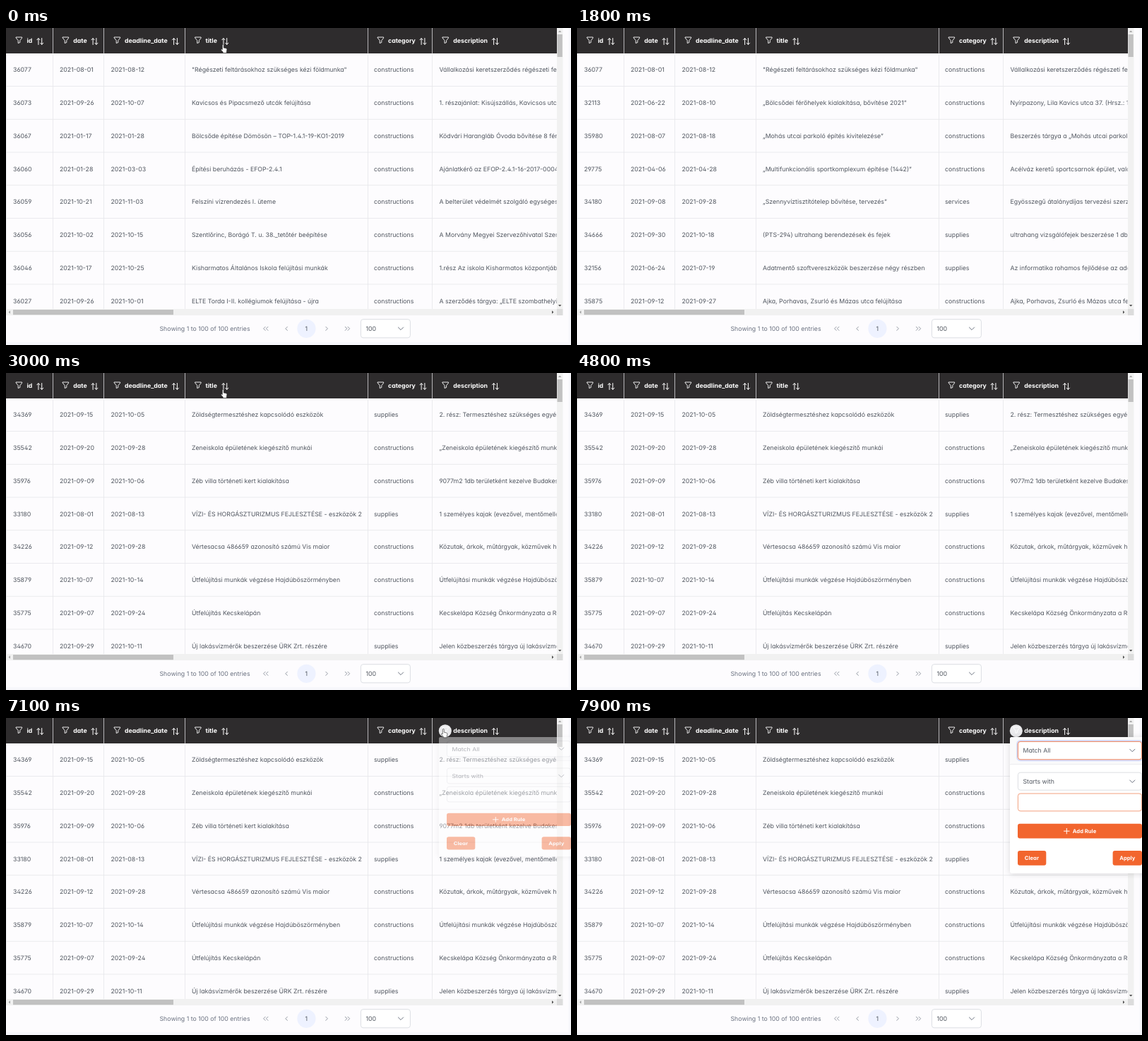
Animation of 800x449 px, one loop 8000 ms. Source, as an HTML page:

```html
<!DOCTYPE html>
<html lang="hu">
<head>
<meta charset="utf-8">
<title>Table sorting</title>
<style>
html, body { margin: 0; width: 100%; height: 100%; overflow: hidden; background: #fdfcfe; }
svg { display: block; width: 100vw; height: 100vh; }
text {
  font: 400 8.75px Inter, "Open Sans", sans-serif;
  font-feature-settings: "cv02", "cv03", "cv04", "cv11";
  text-rendering: geometricPrecision;
  fill: #50565f;
  white-space: pre;
}
.head { font-weight: 700; fill: #fff; }
.btn { font-size: 7.66px; font-weight: 700; fill: #fff; }
.muted { fill: #6b7280; }
.line { fill: none; stroke-linecap: round; stroke-linejoin: round; }
#sheet { filter: drop-shadow(0 1px 4px rgba(0, 0, 0, .14)); }
</style>
</head>
<body>
<svg id="stage" viewBox="0 0 800 449"></svg>
<script>
const COL_X = [10, 76, 148.5, 263, 521, 613.5];
const DIVIDERS = [66, 138, 253, 512, 603];
const ROW_H = 46.74, HEAD_H = 36, ORANGE = '#f2652e';

// name, filter icon x, label x, sort icon x
const HEADERS = [
  ['id', 18.5, 29.5, 48.3],
  ['date', 84.5, 95.3, 125.5],
  ['deadline_date', 157.5, 168, 240],
  ['title', 272, 282.5, 310.3],
  ['category', 530.5, 541, 590.5],
  ['description', 622.3, 633.3, 693]
];

const PAGES = [`
36077|2021-08-01|2021-08-12|"Régészeti feltárásokhoz szükséges kézi földmunka"|constructions|Vállalkozási keretszerződés régészeti feltárás
36073|2021-09-26|2021-10-07|Kavicsos és Pipacsmező utcák felújítása|constructions|1. részajánlat: Kisújszállás, Kavicsos utca
36067|2021-01-17|2021-01-28|Bölcsőde építése Dömösön – TOP-1.4.1-19-KO1-2019|constructions|Ködvári Harangláb Óvoda bővítése 8 férőhellyel
36060|2021-01-28|2021-03-03|Építési beruházás - EFOP-2.4.1|constructions|Ajánlatkérő az EFOP-2.4.1-16-2017-00045
36059|2021-10-21|2021-11-03|Felszíni vízrendezés I. üteme|constructions|A belterület védelmét szolgáló egységes vízelvezetés
36056|2021-10-02|2021-10-15|Szentlőrinc, Borágó T. u. 38._tetőtér beépítése|constructions|A Morvány Megyei Szervezőhivatal Szentlőrinc
36046|2021-10-17|2021-10-25|Kisharmatos Általános Iskola felújítási munkák|constructions|1.rész Az iskola Kisharmatos központjában
36027|2021-09-26|2021-10-01|ELTE Torda I-II. kollégiumok felújítása - újra|constructions|A szerződés tárgya: „ELTE szombathelyi`, `
36077|2021-08-01|2021-08-12|"Régészeti feltárásokhoz szükséges kézi földmunka"|constructions|Vállalkozási keretszerződés régészeti feltárás
32113|2021-06-22|2021-08-10|„Bölcsődei férőhelyek kialakítása, bővítése 2021”|constructions|Nyírpazony, Lila Kavics utca 37. (Hrsz.: 112)
35980|2021-08-07|2021-08-18|„Mohás utcai parkoló építés kivitelezése”|constructions|Beszerzés tárgya a „Mohás utcai parkoló építés
29775|2021-04-06|2021-04-28|„Multifunkcionális sportkomplexum építése (1442)”|constructions|Acélváz keretű sportcsarnok épület, valamint
34180|2021-09-08|2021-09-28|„Szennyvíztisztítótelep bővítése, tervezés”|services|Egyösszegű átalánydíjas tervezési szerződés
34666|2021-09-30|2021-10-18|(PTS-294) ultrahang berendezések és fejek|supplies|ultrahang vizsgálófejek beszerzése 1 db
32156|2021-06-24|2021-07-19|Adatmentő szoftvereszközök beszerzése négy részben|supplies|Az informatika rohamos fejlődése az adatok
35875|2021-09-12|2021-09-27|Ajka, Porhavas, Zsurló és Mázas utca felújítása|constructions|Ajka, Porhavas, Zsurló és Mázas utca felújítása`, `
34369|2021-09-15|2021-10-05|Zöldségtermesztéshez kapcsolódó eszközök|supplies|2. rész: Termesztéshez szükséges egyéb
35542|2021-09-20|2021-09-28|Zeneiskola épületének kiegészítő munkái|constructions|„Zeneiskola épületének kiegészítő munkái”
35976|2021-09-09|2021-10-06|Zéb villa történeti kert kialakítása|constructions|9077m2 1db területként kezelve Budakeszi
33180|2021-08-01|2021-08-13|VÍZI- ÉS HORGÁSZTURIZMUS FEJLESZTÉSE - eszközök 2|supplies|1 személyes kajak (evezővel, mentőmellénnyel)
34226|2021-09-12|2021-09-28|Vértesacsa 486659 azonosító számú Vis maior|constructions|Közutak, árkok, műtárgyak, közművek helyreállítása
35879|2021-10-07|2021-10-14|Útfelújítási munkák végzése Hajdúböszörményben|constructions|Útfelújítási munkák végzése Hajdúböszörményben
35775|2021-09-07|2021-09-24|Útfelújítás Kecskelápán|constructions|Kecskelápa Község Önkormányzata a Rendelet
34670|2021-09-29|2021-10-11|Új lakásvízmérők beszerzése ÜRK Zrt. részére|supplies|Jelen közbeszerzés tárgya új lakásvízmérők`];

const FUNNEL = 'M-4.1-4.2H4.1V-3L1.3.5V3.3L-1.3 4.3V.5L-4.1-3Z';
const SORT = 'M-2.4 4.5V-4.2M-4.5-2.2L-2.4-4.4-.3-2.2M2.4-4.5V4.2M.3 2.2L2.4 4.4 4.5 2.2';
const DOWN = 'M-3.6-1.8L0 1.8 3.6-1.8';
const LEFT = 'M1.4-2.6L-1.2 0 1.4 2.6', RIGHT = 'M-1.4-2.6L1.2 0-1.4 2.6';
const HAND = 'M2.3 7.2V1.3a1 1 0 0 1 2 0V5l3.4.8q1.3.4 1.2 1.8l-.6 3.1v1.9H3.2v-1.5L.7 8.3q-.6-1 .2-1.4.7-.3 1.4.8z';

const rect = (x, y, w, h, fill, extra = '') =>
  `<rect x="${x}" y="${y}" width="${w}" height="${h}" fill="${fill}" ${extra}/>`;
const text = (x, y, s, cls = '') => `<text x="${x}" y="${y}" class="${cls}">${s}</text>`;
const icon = (d, x, y, color, width = 1) =>
  `<path class="line" d="${d}" transform="translate(${x} ${y})" stroke="${color}" stroke-width="${width}"/>`;
const solid = (d, fill) => `<path d="${d}" fill="${fill}"/>`;
const box = (x, y, w, h, stroke, id = '') =>
  rect(x, y, w, h, '#fff', `rx="3.5" stroke="${stroke}" stroke-width=".8" ${id && `id="${id}"`}`);

function drawPage(rows, i) {
  const cells = rows.trim().split('\n').map((row, r) =>
    row.split('|').map((s, c) => text(COL_X[c], 62.4 + r * ROW_H, s)).join('')).join('');
  return `<g id="page${i}" clip-path="url(#table)">${cells}</g>`;
}

function drawGrid() {
  let out = rect(0, 0, 780, HEAD_H, '#2e2c2d');
  for (let r = 1; r < 8; r++) out += rect(0, 35.4 + r * ROW_H, 780, .8, '#e6e6ea');
  out += rect(0, HEAD_H, .8, 362, '#e6e6ea');
  for (const x of DIVIDERS) {
    out += rect(x, HEAD_H, .8, 362, '#e6e6ea') + rect(x, 0, .8, HEAD_H, '#d8d8da');
  }
  for (const [name, fx, tx, sx] of HEADERS) {
    out += icon(FUNNEL, fx, 17.2, '#fff', .9) + text(tx, 21.3, name, 'head') + icon(SORT, sx, 19, '#fff');
  }
  return out;
}

function drawScrollbars() {
  return rect(780, 0, 8.5, 398, '#f1f1f1') + rect(780.6, 9, 7.2, 32, '#c1c1c1') +
    rect(0, 398, 780, 9, '#f1f1f1') + rect(10, 399, 227, 7.2, '#c1c1c1') +
    rect(780, 398, 8.5, 9, '#dcdcdc') +
    solid('M782 6l2.2-2.4 2.2 2.4z', '#a3a3a3') + solid('M782 392l2.2 2.4 2.2-2.4z', '#505050') +
    solid('M6 400.3l-2.4 2.2 2.4 2.2z', '#a3a3a3') + solid('M773 400.3l2.4 2.2-2.4 2.2z', '#505050');
}

function drawPager() {
  const grey = '#7b828e', y = 425.8;
  return text(217.5, 429, 'Showing 1 to 100 of 100 entries', 'muted') +
    icon(LEFT, 365.8, y, grey, .8) + icon(LEFT, 369.6, y, grey, .8) + icon(LEFT, 397, y, grey, .8) +
    '<circle cx="425.4" cy="425.8" r="13.1" fill="#eef2ff"/>' + text(423.5, 429, '1') +
    icon(RIGHT, 454.2, y, grey, .8) + icon(RIGHT, 481.6, y, grey, .8) + icon(RIGHT, 485.4, y, grey, .8) +
    box(502.4, 412.6, 70, 26.2, '#d4d7dc') + text(509.5, 429, '100') + icon(DOWN, 559, y, '#6b7280');
}

function drawPanel() {
  const border = '#d4d7dc', button = 'rx="3"';
  return '<g id="panel">' +
    rect(613, 27, 200, 193, '#fff', 'id="sheet" rx="3"') +
    rect(613, 27, 200, 38, '#fafafb', 'rx="3"') + rect(613, 65, 200, .8, '#e6e8eb') +
    rect(623.2, 32.2, 177.6, 28, 'none', 'id="ring" rx="4.5" stroke="#c7d2fe" stroke-width="2"') +
    box(624.4, 33.4, 175.2, 25.4, border, 'match') + text(631.5, 49.3, 'Match All') +
    icon(DOWN, 786.3, 46, '#6b7280') +
    box(624.4, 77.2, 175.2, 25, border) + text(631.5, 92.9, 'Starts with') +
    icon(DOWN, 786.3, 89.8, '#6b7280') +
    box(624.4, 107, 175.2, 24.8, border, 'field') +
    rect(624, 149.8, 176, 20.8, ORANGE, button) +
    icon('M-3.8 0H3.8M0-3.8V3.8', 693.3, 160.2, '#fff') + text(701.8, 163.1, 'Add Rule', 'btn') +
    rect(624, 188, 40.3, 20.8, ORANGE, button) + text(633.8, 201.3, 'Clear', 'btn') +
    rect(758.6, 188, 41.4, 20.8, ORANGE, button) + text(768.2, 201.3, 'Apply', 'btn') +
    '</g>';
}

document.getElementById('stage').innerHTML =
  '<clipPath id="table"><rect width="779.6" height="398"/></clipPath>' +
  rect(0, 0, 800, 449, '#fdfcfe') +
  rect(796.5, 0, 3.5, 449, '#f7f7fb') + rect(0, 445, 800, 4, '#f7f7fb') +
  drawGrid() + PAGES.map(drawPage).join('') + drawScrollbars() + drawPager() +
  '<g id="hover"><circle cx="621.8" cy="18.2" r="9" fill="#ebebed"/>' +
  icon(FUNNEL, 622.3, 17.2, '#fff', .9) + '</g>' +
  drawPanel() +
  `<path id="hand" d="${HAND}" fill="#fff" stroke="#222" stroke-width=".6"/>`;

const $ = id => document.getElementById(id);
const show = (id, on) => $(id).setAttribute('visibility', on ? 'visible' : 'hidden');

// time, x, y
const TO_FILTER = [[5600, 304, 23], [6200, 531, 23.5], [6400, 616, 15.2]];
const TO_FIELD = [[7100, 616, 15.2], [7700, 700, 112]];

function along(path, t) {
  const i = Math.max(1, path.findIndex(p => p[0] >= t));
  if (t >= path[path.length - 1][0]) return path[path.length - 1].slice(1);
  const [a, b] = [path[i - 1], path[i]];
  const k = (t - a[0]) / (b[0] - a[0]);
  return [a[1] + (b[1] - a[1]) * k, a[2] + (b[2] - a[2]) * k];
}

function handAt(t) {
  if (t < 900 || (t >= 2700 && t < 4800)) return [304, 23];
  if (t < 5600 || t >= 7700) return null;
  return along(t < 7100 ? TO_FILTER : TO_FIELD, t);
}

function render(now) {
  const t = Math.floor(now % 8000 / 100) * 100;
  const page = t < 1800 ? 0 : t < 3000 ? 1 : 2;
  PAGES.forEach((_, i) => show('page' + i, i === page));

  $('hover').setAttribute('opacity', t < 6500 ? 0 : t < 6600 ? .55 : 1);

  const opening = t < 7200;
  show('panel', t >= 7100);
  $('panel').setAttribute('opacity', opening ? .43 : 1);
  $('panel').setAttribute('transform', `translate(0 27) scale(1 ${opening ? .877 : 1}) translate(0 -27)`);
  $('ring').setAttribute('opacity', opening ? 0 : .8);
  $('match').setAttribute('stroke', opening ? '#d4d7dc' : ORANGE);
  $('field').setAttribute('stroke', t < 7600 ? '#d4d7dc' : '#f08a5e');

  const hand = handAt(t);
  show('hand', hand);
  if (hand) $('hand').setAttribute('transform', `translate(${hand})`);
}

const start = performance.now();
function tick() {
  render(performance.now() - start);
  requestAnimationFrame(tick);
}
tick();
</script>
</body>
</html>
```
